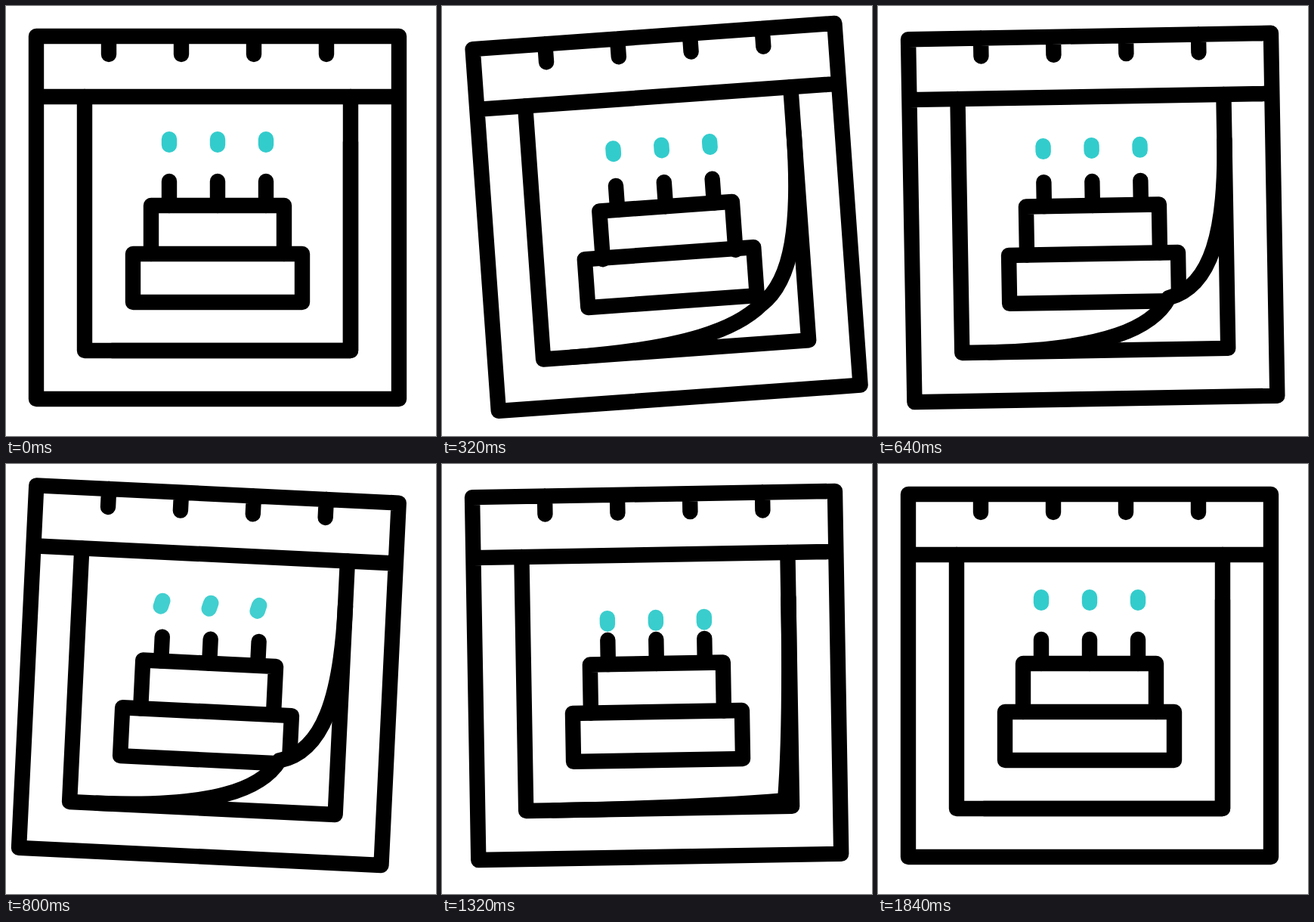
Animation, 569 px wide and 569 px high, one loop 2000 ms. Source, as an HTML page:

```html
<!DOCTYPE html>
<html lang="en">
<head>
<meta charset="utf-8">
<title>Birthday calendar</title>
<style>
  html, body { margin: 0; width: 100%; height: 100%; overflow: hidden; background: #fff; }
  svg { display: block; width: 100%; height: 100%; }
  .ink { fill: none; stroke: #000; stroke-width: 20.4; stroke-linecap: round; stroke-linejoin: round; }
  .flame { fill: none; stroke: #33cccc; stroke-width: 20.4; stroke-linecap: round; }
</style>
</head>
<body>
<svg viewBox="0 0 569 569">
  <g id="calendar">
    <path id="risingFlames" class="flame"/>
    <path id="fadingFlames" class="flame"/>
    <g id="upperTier" class="ink">
      <path d="M216 264V232M280 264V232M344 264V232"/>
      <path d="M192 328V264H368V328"/>
    </g>
    <path class="ink" d="M168 328H392V392H168Z"/>
    <path id="underPage" fill="#fff"/>
    <path id="curl" class="ink"/>
    <path class="ink" d="M104 120V456H456V120"/>
    <path class="ink" d="M40 40H520V520H40ZM40 120H520M136 40V64M232 40V64M328 40V64M424 40V64"/>
  </g>
</svg>
<script>
const LOOP = 2000, STEP = 40;
const CANDLES = [216, 280, 344];
const el = id => document.getElementById(id);

const mix = (a, b, k) => a + (b - a) * k;
const ease = (t, start, end) => {
  const u = Math.min(1, Math.max(0, (t - start) / (end - start)));
  return u * u * (3 - 2 * u);
};

// Eased value along [time, value] keys.
function track(t, keys) {
  let value = keys[0][1];
  for (let i = 1; i < keys.length; i++) {
    const [start, from] = keys[i - 1], [end, to] = keys[i];
    value += (to - from) * ease(t, start, end);
  }
  return value;
}

const SWING = [[0, 0], [440, -5], [840, 3], [1280, -1], [1840, 0]];
const DIP = [[0, 0], [200, 5], [400, 0]];
const LIFT = [[60, 0], [440, 1], [800, 1], [1460, 0]];

function curlPath(k) {
  const point = (x0, y0, x1, y1) => mix(x0, x1, k) + " " + mix(y0, y1, k);
  const tip = point(456, 456, 378.7, 388);
  return `M456 180C456 300 ${point(456, 380, 436, 374)} ${tip}` +
    `C${point(380, 456, 357, 427)} ${point(295, 456, 295, 455)} 140 456`;
}

function drawFlames(node, dx, y, length, degrees, opacity) {
  const a = degrees * Math.PI / 180;
  const hx = Math.sin(a) * length / 2, hy = -Math.cos(a) * length / 2;
  node.setAttribute("d", CANDLES.map(x =>
    `M${x + dx + hx} ${y + hy}L${x + dx - hx} ${y - hy}`).join(""));
  node.setAttribute("opacity", opacity);
}

function render(t) {
  el("calendar").setAttribute("transform", `rotate(${track(t, SWING)} 280 40)`);
  el("upperTier").setAttribute("transform", `translate(0 ${track(t, DIP)})`);

  const blown = ease(t, 720, 1200);
  drawFlames(el("fadingFlames"), -38.4 * blown, 180 + 8 * ease(t, 0, 200) + blown,
    mix(7.6, 13, blown), 117 * ease(t, 680, 1200), 1 - blown);
  drawFlames(el("risingFlames"), 0, mix(226, 180, ease(t, 1000, 1720)),
    7.6, 0, ease(t, 1000, 1360));

  const curl = curlPath(track(t, LIFT));
  el("curl").setAttribute("d", curl);
  el("underPage").setAttribute("d", curl + "H456Z");
}

const origin = performance.now();
function tick() {
  const t = (performance.now() - origin) % LOOP;
  render(Math.floor(t / STEP) * STEP);
  requestAnimationFrame(tick);
}
tick();
</script>
</body>
</html>
```
